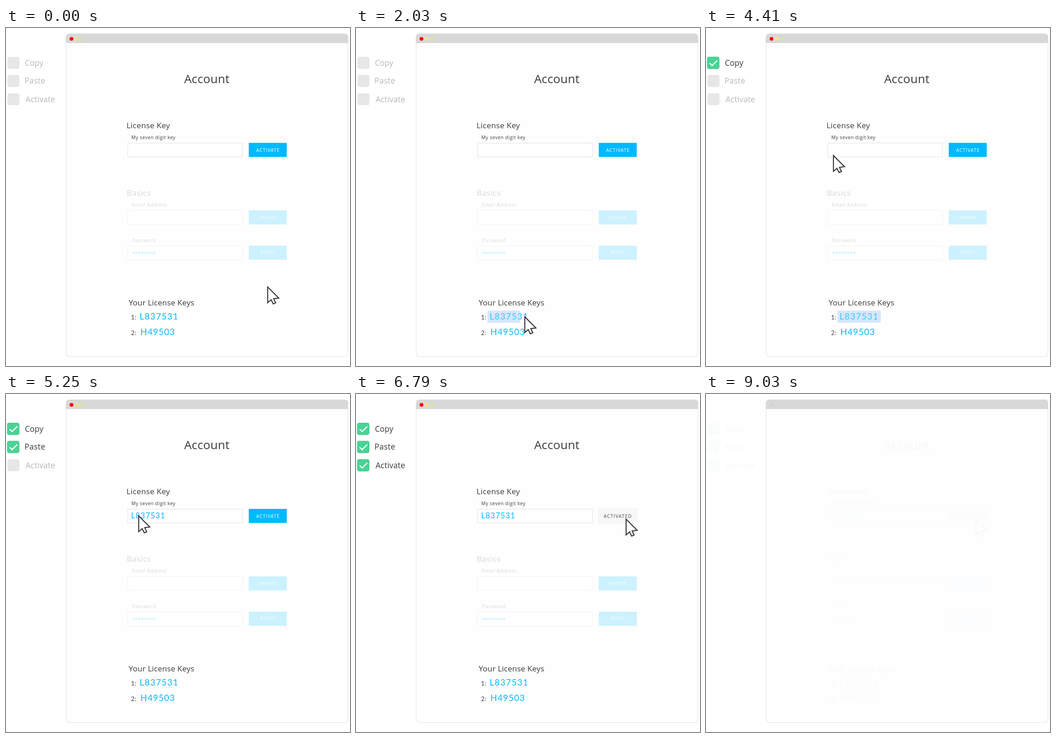
An HTML page that plays this animation: 755x742 px, repeating every 9.24 s.

```html
<!DOCTYPE html>
<html lang="en">
<head>
<meta charset="utf-8">
<title>License activation</title>
<style>
  html, body { margin: 0; width: 100%; height: 100%; overflow: hidden; background: #fff; }
  svg { display: block; width: 100%; height: 100%; }
  text { font-family: "Open Sans", "Noto Sans", sans-serif; white-space: pre; }
  .num { font-family: Lato, "Open Sans", sans-serif; }
</style>
</head>
<body>
<svg id="stage" viewBox="0 0 755 742">
  <rect x="132" y="12.8" width="618.5" height="708.7" rx="7" fill="#fefefe" stroke="#e2e2e2" stroke-width="1.2"/>
  <path d="M131.5 33V19.5a7 7 0 0 1 7-7H744a7 7 0 0 1 7 7V33z" fill="#d8d8d8"/>
  <g id="content">
    <circle cx="143.7" cy="23.8" r="4.1" fill="#f00"/>
    <circle cx="155.6" cy="23.8" r="4.1" fill="#ffdf8c"/>
    <circle cx="167.9" cy="23.8" r="4.1" fill="#d2e6a2"/>
    <g id="page"></g>
    <rect id="mark" x="288.5" y="620.3" width="0" height="26.7" fill="#a2cbfa" fill-opacity=".45"/>
    <g id="done">
      <rect x="530.5" y="250.8" width="87.7" height="33.2" fill="#f7f7f7"/>
    </g>
    <path id="cursor" d="M0 0V34.5L7.6 28 12.2 37.2 17.6 34.8 13.2 25.9 24.3 24.4z" fill="#fff" stroke="#3a3a3a" stroke-width="2.3"/>
  </g>
</svg>
<script>
const LOOP = 9240, STEP = 70;
const INK = '#3b3b3b', PALE = '#d8d8d8', BLUE = '#00b9ff', PALE_BLUE = '#ccf1ff';
const $ = id => document.getElementById(id);
const page = $('page');

function add(parent, tag, attrs, text) {
  const el = document.createElementNS('http://www.w3.org/2000/svg', tag);
  for (const k in attrs) el.setAttribute(k, attrs[k]);
  if (text) el.textContent = text;
  parent.appendChild(el);
  return el;
}

function label(str, x, y, size, gap, fill, cls = '', parent = page) {
  return add(parent, 'text', {
    x, y, 'font-size': size, 'letter-spacing': gap, fill, class: cls
  }, str);
}

const field = (y, stroke) => add(page, 'rect', {
  x: 267.2, y: y + 0.2, width: 251.6, height: 30.4, fill: '#fff', stroke, 'stroke-width': 1.4
});
const button = (y, fill) => add(page, 'rect', { x: 532.8, y, width: 83.4, height: 30.8, fill });

// Account form
label('Account', 390.9, 121, 26, 0.25, INK);
label('License Key', 264.4, 220, 17.2, 0.29, INK);
label('My seven digit key', 275, 243.6, 10.3, 0.56, INK);
field(252.4, '#e8e8e8');
button(252.2, BLUE);
label('ACTIVATE', 549, 271.8, 10.3, 0.95, '#fff');
const pasted = label('L837531', 274.5, 273.4, 17, 1.08, BLUE, 'num');

label('Basics', 264.9, 368.2, 17.2, 0.6, PALE);
label('Email Address', 276, 391.9, 10.3, 0.71, PALE);
field(400.4, '#f5f5f5');
button(400.4, PALE_BLUE);
label('UPDATE', 554.7, 418.6, 9.3, 0.85, '#fff');

label('Password', 276.8, 470, 10.3, 0.77, PALE);
field(478.2, '#f5f5f5');
button(478, PALE_BLUE);
label('RESET', 558.1, 496, 9.5, 1.2, '#fff');
for (let i = 0; i < 8; i++) {
  add(page, 'path', {
    d: 'M0 -2.7V2.7M-2.4 -1.4L2.4 1.4M-2.4 1.4L2.4 -1.4',
    transform: `translate(${280 + i * 6.45} 493.6)`,
    stroke: PALE_BLUE, 'stroke-width': 1.4
  });
}

label('Your License Keys', 269.3, 608.6, 17.2, 0.13, INK);
label('1:', 274.4, 639.6, 13, 0.6, INK, 'num');
label('2:', 274.6, 673.6, 13, 0.6, INK, 'num');
label('L837531', 293.2, 640.4, 19, 1.4, BLUE, 'num');
label('H49503', 295.1, 673.8, 19, 1.1, BLUE, 'num');
label('ACTIVATED', 543.5, 272, 10.5, 1.05, '#4c4c4c', '', $('done'));

// Checklist
const tasks = [
  ['Copy', 41.4, 82.8, 76.5, 0, 2730],
  ['Paste', 40.5, 121.8, 116.2, 0.3, 4690],
  ['Activate', 43, 162.8, 156.4, 0.1, 6790]
].map(([name, x, base, mid, gap, at]) => {
  const text = label(name, x, base, 17.4, gap, INK);
  add(page, 'rect', { x: 3.2, y: mid - 13.2, width: 26.4, height: 26.4, rx: 4.5, fill: '#e7e7e7' });
  const tick = add(page, 'g', { transform: `translate(0 ${mid})` });
  add(tick, 'rect', { x: 2.2, y: -13.5, width: 27.2, height: 27, rx: 4.5, fill: '#4bd295' });
  add(tick, 'path', {
    d: 'M8 .6L13.4 6 24.8 -5.4', fill: 'none', stroke: '#fff', 'stroke-width': 2.4
  });
  return { text, tick, at };
});

const part = (t, a, b) => Math.min(1, Math.max(0, (t - a) / (b - a)));
const inOut = (t, a, b) => {
  const p = part(t, a, b);
  return p < 0.5 ? 4 * p ** 3 : 1 - 4 * (1 - p) ** 3;
};
const out = (t, a, b, pow) => 1 - (1 - part(t, a, b)) ** pow;
const show = (el, on) => el.setAttribute('visibility', on ? 'inherit' : 'hidden');

// Each leg shifts the cursor by dx, dy; legs add up.
function cursorAt(t) {
  const legs = [
    [inOut(t, 740, 1690), -284.5, 68],
    [out(t, 1680, 2310, 2), 100.5, -3],
    [inOut(t, 3680, 4640), -117, -374],
    [inOut(t, 4640, 5260), 15.5, 8],
    [inOut(t, 5117, 6167), 301, 8],
    [inOut(t, 5900, 6400), 3, -0.8]
  ];
  return legs.reduce(([x, y], [p, dx, dy]) => [x + p * dx, y + p * dy], [574.3, 568.5]);
}

function fadeAt(t) {
  if (t < 8470) return 1;
  if (t < 8610) return 0.92;
  return Math.max(0.03, 1 - (t - 8420) / 630);
}

function draw(time) {
  const t = Math.floor((time % LOOP) / STEP) * STEP;
  const [x, y] = cursorAt(t);
  $('cursor').setAttribute('transform', `translate(${x.toFixed(2)} ${y.toFixed(2)})`);
  $('mark').setAttribute('width', 95 * out(t, 1680, 2310, 1.72));
  show($('mark'), t >= 1750 && t < 4690);
  show(pasted, t >= 4690);
  show($('done'), t >= 6720);
  for (const { text, tick, at } of tasks) {
    show(tick, t >= at);
    text.setAttribute('fill', t >= at ? INK : '#b8b8b8');
  }
  $('content').setAttribute('opacity', fadeAt(t));
}

const start = performance.now();
function tick(now) {
  draw(Math.max(0, now - start));
  requestAnimationFrame(tick);
}
draw(0);
requestAnimationFrame(tick);
</script>
</body>
</html>
```
